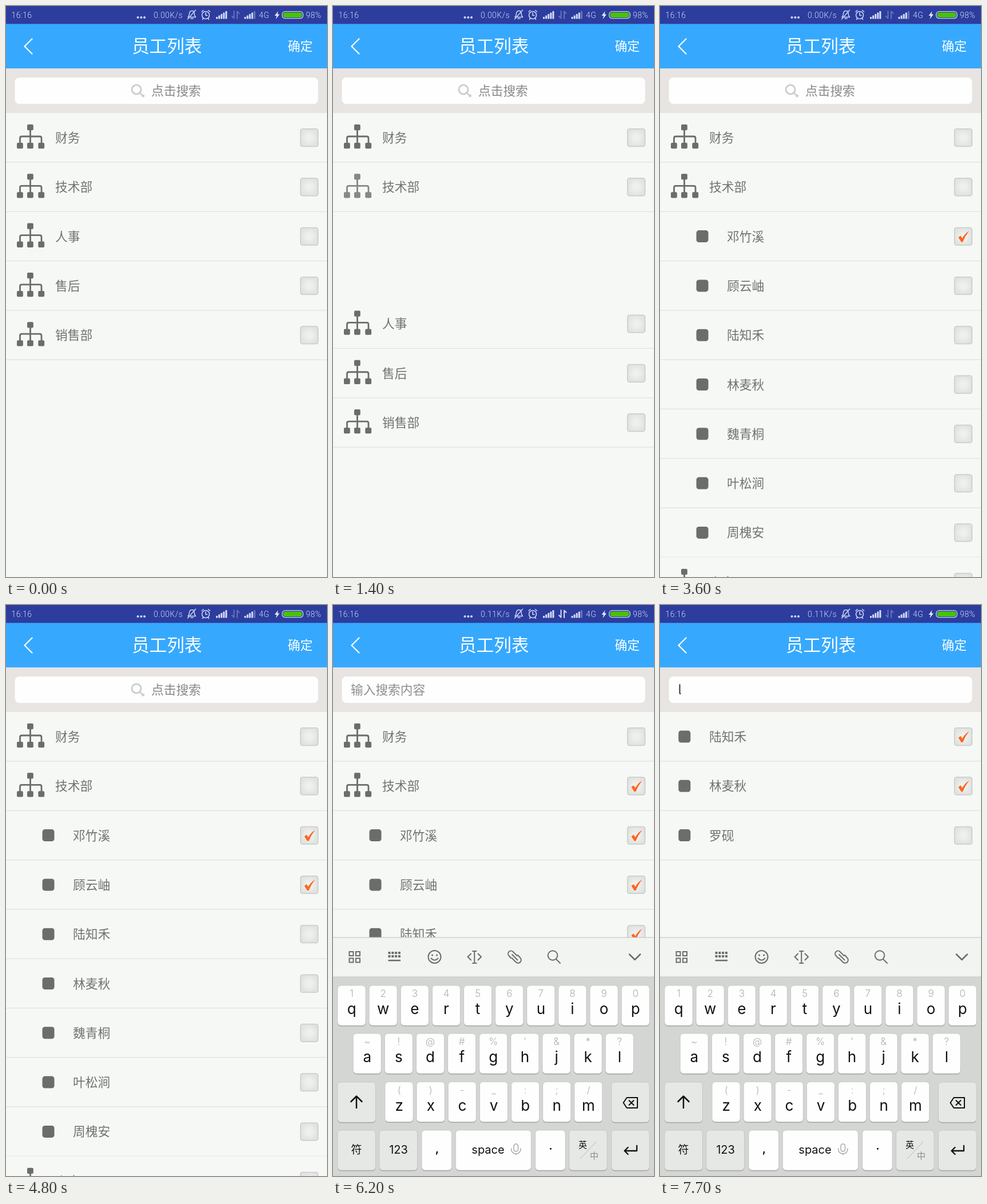
An HTML page that plays this animation: 561x998 px, repeating every 8 s.

```html
<!DOCTYPE html>
<html lang="zh">
<head>
<meta charset="utf-8">
<title>员工列表</title>
<style>
  html, body { margin: 0; width: 100%; height: 100%; overflow: hidden; background: #f6f8f6; }
  svg { display: block; width: 100vw; height: 100vh; }
  text { font-family: "Noto Sans CJK SC", "Noto Sans CJK", sans-serif; font-weight: 300; font-size: 21.7px; fill: #707270; }
  .status text { font-family: Roboto, sans-serif; font-size: 14px; letter-spacing: .4px; fill: #cdd4f2; }
  .keys text { font-family: Inter, "Noto Sans CJK SC", sans-serif; font-weight: 400; font-size: 20px; fill: #111; text-anchor: middle; }
  .keys .letter { font-size: 26px; }
  .keys .hint { font-size: 17px; font-weight: 300; fill: #adafad; }
  .line { fill: none; stroke-linecap: round; stroke-linejoin: round; }
</style>
</head>
<body>
<svg id="stage" viewBox="0 0 561 998" preserveAspectRatio="none"></svg>
<script>
const LOOP = 8000, TICK = 100, ROW = 86.3, FIRST = 230;
const GREY = '#6b6d6b';
const staff = ['邓竹溪', '顾云岫', '陆知禾', '林麦秋', '魏青桐', '叶松涧', '周槐安'];

const rect = (x, y, w, h, fill, r = 0, extra = '') =>
  `<rect x="${x}" y="${y}" width="${w}" height="${h}" rx="${r}" fill="${fill}" ${extra}/>`;
const line = (d, color, width, extra = '') =>
  `<path class="line" d="${d}" stroke="${color}" stroke-width="${width}" ${extra}/>`;
const text = (x, y, s, attrs = '') => `<text x="${x}" y="${y}" ${attrs}>${s}</text>`;
const group = (id, body, attrs = '') => `<g id="${id}" ${attrs}>${body}</g>`;

// List rows, drawn around a vertical centre of zero
const treeIcon = line('M42.5 -15V12M24.5 12V1Q24.5 -2 27.5 -2H59Q62 -2 62 1V12', GREY, 2.8) +
  [[37, -23], [19, 9], [37, 9], [56.3, 9]].map(([x, y]) => rect(x, y, 10.8, 10.3, GREY, 2)).join('');
const memberIcon = x => rect(x, -10.5, 21, 21, GREY, 4.5);
const checkBox = rect(514.7, -15.2, 30.6, 30.6, 'url(#box)', 3.5, 'stroke="#c9cbc9" stroke-width="1.5"');
const tick = `<path fill="#ff641e" d="M521.5 2L525.3 -1L528.3 3.5Q533 -5 540 -9Q533 0 529 10H526.5Z"/>`;

function row(id, index, label, textX, icon, checked) {
  return group(id,
    group(id + 'Icon', icon) + text(textX, 8, label) + checkBox +
    group(id + 'Tick', tick, checked ? '' : 'visibility="hidden"') +
    rect(0, 42.4, 561, 1.2, '#dfe1df'),
    `transform="translate(0 ${FIRST + index * ROW})"`);
}
const branch = (id, index, label) => row(id, index, label, 86, treeIcon);
const member = (id, index, label) => row(id, index, label, 117, memberIcon(63.5));
const found = (id, index, label, checked) => row(id, index, label, 86, memberIcon(32.3), checked);

function bars(x, lastOpacity) {
  return [0, 1, 2, 3, 4].map(i =>
    rect(x + i * 4.1, 19 - i * 2.5, 3, 3.5 + i * 2.5, '#d5dbf5', .5, i === 4 ? `opacity="${lastOpacity}"` : '')).join('');
}

function statusBar() {
  const c = '#cdd4f2';
  return group('status',
    rect(0, 0, 561, 31.3, '#2c3d9e') +
    text(9.5, 21, '16:16') +
    [230.5, 236.3, 242].map(x => `<circle cx="${x}" cy="20" r="2.1" fill="${c}"/>`).join('') +
    text(258, 21, '0.00K/s', 'id="speed"') +
    line('M318 19.5Q320.5 17 320.5 13Q321 8.500 325 8.500Q329 8.500 329 13Q329 17 331.500 19.500ZM323 22H327M317.500 23L331.500 7', c, 1.5) +
    line('M342.500 16A6.500 6.500 0 1 0 355.500 16A6.500 6.500 0 1 0 342.500 16M349 12V16.500H352M342 10L345 7.500M353.500 7.500L356.500 10M344.500 22L343.500 23.500M353.500 22L354.500 23.500', c, 1.6) +
    bars(367, 1) + bars(416.5, .35) +
    group('traffic', line('M398.500 9V21.500L395 18M404 22V9.500L407.500 13', '#d5dbf5', 2)) +
    text(442, 21, '4G') +
    `<path d="M475.500 9L469.500 17H473L471.500 23L478 14.500H474.500Z" fill="#e6eafc"/>` +
    rect(482.7, 9.7, 36.5, 12, 'none', 5, `stroke="${c}" stroke-width="1.3"`) +
    rect(484.5, 11.5, 32.9, 8.400, '#47c400', 3.5) +
    text(524, 21, '98%'), 'class="status"');
}

function header() {
  return rect(0, 31, 561, 78.3, '#36a9fe') +
    line('M45.5 57.500L32.500 70.500L45.500 83.500', '#fff', 2.3) +
    text(220, 81, '员工列表', 'style="font-size:30.6px;fill:#fff"') +
    text(492.5, 78, '确定', 'style="fill:#fff"') +
    rect(0, 109.3, 561, 77.7, '#e7e4e1') +
    rect(15.5, 125, 530, 46.3, '#fdfefd', 8) +
    group('searchIdle',
      `<circle cx="228" cy="146" r="8" fill="none" stroke="#cdcfcd" stroke-width="3"/>` +
      line('M234 152L238.500 156.500', '#cdcfcd', 2.5) +
      `<circle cx="239.500" cy="157" r="2.5" fill="#cdcfcd"/>` +
      text(254, 156, '点击搜索', 'style="fill:#878987"')) +
    text(31, 156, '输入搜索内容', 'id="hintText" style="fill:#8d8f8d"') +
    text(31.5, 156, 'l', 'id="query" style="fill:#333"') +
    rect(31, 136, 1.5, 25, '#777', 0, 'id="caret"');
}

function keyboard() {
  const key = (x, y, w, fill = '#fdfefd', id = '') =>
    rect(x, y + 1.5, w, 70, '#a4a6a4', 6) +
    rect(x, y, w, 70, fill, 6, `${id && `id="${id}"`} stroke="#bfc1bf" stroke-width=".7"`);
  const letters = (x0, y, chars, hints) => [...chars].map((c, i) => {
    const x = x0 + i * 55.13, mid = x + 24.6;
    return key(x, y, 49, '#fdfefd', 'key-' + c) +
      text(mid, y + 20, hints[i], 'class="hint"') + text(mid, y + 50, c, 'class="letter"');
  }).join('');
  const soft = '#e6e8e6', ink = '#111';
  const dots = [0, 1, 2, 3].map(i => [606, 612].map(y => rect(96.5 + i * 5.8, y, 4, 4, GREY)).join('')).join('');
  const tiles = [[28.500, 606], [40, 606], [28.500, 617.5], [40, 617.5]].map(([x, y]) =>
    rect(x, y, 7, 7, 'none', 0, `stroke="${GREY}" stroke-width="2"`)).join('');
  return group('keyboard',
    rect(0, 581, 561, 69, '#f2f4f2') + rect(0, 580.5, 561, 1.2, '#c5c7c5') +
    rect(0, 650, 561, 348, '#d4d6d4') + rect(0, 649.5, 561, 1, '#c8cac8') +
    tiles + dots + rect(96.5, 620, 21.5, 2.5, GREY) +
    `<circle cx="177.500" cy="615" r="11" fill="none" stroke="${GREY}" stroke-width="2"/>` +
    `<circle cx="173.500" cy="612" r="1.600" fill="${GREY}"/><circle cx="181.500" cy="612" r="1.600" fill="${GREY}"/>` +
    line('M171.500 617.500Q177.500 624 183.500 617.500', GREY, 2) +
    line('M241 609.500L235.500 615L241 620.500M253.500 609.500L259 615L253.500 620.500M244 605H250.500M247.200 605V626M244 626H250.500', GREY, 2) +
    line('M311 617L307.500 613A4.800 4.800 0 0 1 314.500 606L321.500 613M313 611L322.500 620.500M323 612L327 616.500A4.800 4.800 0 0 1 320 624.500L312.500 617', GREY, 2) +
    `<circle cx="384" cy="612.500" r="8.300" fill="none" stroke="${GREY}" stroke-width="2"/>` +
    line('M390 619L397 626', GREY, 2) +
    line('M518 610.500L527.500 620L537 610.500', GREY, 2.5) +
    letters(8, 665, 'qwertyuiop', '1234567890') +
    letters(35.2, 749, 'asdfghjkl', "~!@#%'&amp;*?".replace('&amp;', '&')) +
    letters(91, 833.5, 'zxcvbnm', '()-_:;/') +
    key(8, 834, 66.5, soft) + line('M41 879V859M31.500 868L41 858.500L50.500 868', ink, 2.5) +
    key(486.5, 834, 66.5, soft) +
    line('M513.500 861H532V879H513.500L507.500 870ZM517.500 866L525.500 874M525.500 866L517.500 874', ink, 2) +
    key(8, 918, 66.5, soft) + text(41, 959, '符', 'style="font-size:19px"') +
    key(81, 918, 66.5, soft) + text(114.5, 959, '123') +
    key(155, 918, 52.5) + text(182, 957, ',', 'style="font-weight:600"') +
    key(214.3, 918, 132) + text(271, 959, 'space') +
    rect(316, 942, 7.500, 13, 'none', 3.7, 'stroke="#a8aaa8" stroke-width="1.5"') +
    line('M311.500 950Q311.500 959 319.700 959Q328 959 328 950M319.700 959V961', '#a8aaa8', 1.5) +
    key(353.5, 918, 52.5) + text(380.5, 957, '·', 'style="font-weight:600"') +
    key(412.500, 918, 66.5, soft) + text(436.5, 949, '英', 'style="font-size:15px"') +
    text(456.5, 967.5, '中', 'style="font-size:15px;fill:#8b8d8b"') + line('M432 968L460 938', '#b9bbb9', 1) +
    key(486.5, 918, 66.5, soft) + line('M531 945V954H509.500M515.500 948L509.500 954L515.500 960', ink, 2.3),
    'class="keys"');
}

const stage = document.getElementById('stage');
stage.innerHTML =
  `<defs><radialGradient id="box"><stop offset=".3" stop-color="#eef0ee"/><stop offset="1" stop-color="#e1e3e1"/></radialGradient>
   <clipPath id="gap"><rect id="gapRect" x="0" y="359.5" width="561" height="0"/></clipPath></defs>` +
  rect(0, 0, 561, 998, '#f6f8f6') +
  group('tree',
    branch('finance', 0, '财务') + branch('tech', 1, '技术部') +
    `<g clip-path="url(#gap)">${group('members', staff.map((name, i) => member('m' + i, i + 2, name)).join(''))}</g>` +
    group('tail', branch('hr', 2, '人事') + branch('service', 3, '售后') + branch('sales', 4, '销售部'))) +
  group('results',
    found('r0', 0, staff[2], true) + found('r1', 1, staff[3], true) + found('r2', 2, '罗砚', false)) +
  header() + statusBar() + keyboard();

const el = id => document.getElementById(id);
const show = (id, on) => el(id).setAttribute('visibility', on ? 'inherit' : 'hidden');
const fade = (id, value) => el(id).setAttribute('opacity', value);
const clamp = v => Math.min(1, Math.max(0, v));
const between = (t, a, b) => t >= a && t < b;

// Row touches: [icon, start, end]
const touches = [['techIcon', 1300, 1600], ['m0Icon', 3000, 3200], ['m1Icon', 3700, 3900], ['techIcon', 4900, 5100]];
const tickTimes = { techTick: 4900, m0Tick: 3100, m1Tick: 3800 };
for (let i = 2; i < staff.length; i++) tickTimes[`m${i}Tick`] = 4900;

function render(t) {
  const open = 1 - (1 - clamp((t - 1300) / 600)) ** 1.6;
  const shift = open * staff.length * ROW;
  el('tail').setAttribute('transform', `translate(0 ${shift})`);
  el('gapRect').setAttribute('height', shift);
  fade('members', clamp((t - 1400) / 400));

  for (const [id] of touches) fade(id, touches.some(([i, a, b]) => i === id && between(t, a, b)) ? .8 : 1);
  for (const id in tickTimes) show(id, t >= tickTimes[id]);

  el('speed').textContent = t < 5400 ? '0.00K/s' : '0.11K/s';
  fade('traffic', between(t, 5400, 6600) ? 1 : .35);

  const typed = t >= 7000;
  show('searchIdle', t < 5900);
  show('hintText', t >= 5900 && !typed);
  show('query', typed);
  show('caret', between(t, 6600, 7500));
  el('caret').setAttribute('x', typed ? 37 : 31);
  show('keyboard', t >= 6200);
  el('key-l').setAttribute('fill', between(t, 6900, 7000) ? '#d9dbd9' : '#fdfefd');
  show('tree', t < 7100);
  show('results', t >= 7100);
}

const start = performance.now();
function loop() {
  const t = (performance.now() - start) % LOOP;
  render(Math.floor(t / TICK) * TICK);
  requestAnimationFrame(loop);
}
loop();
</script>
</body>
</html>
```
